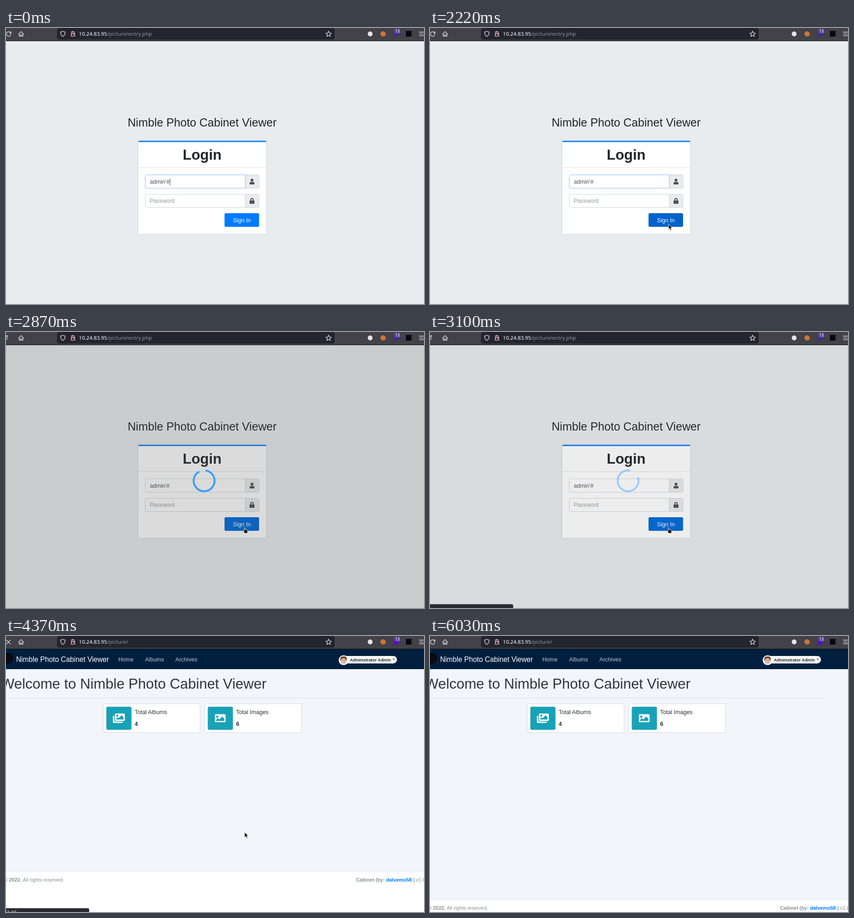
An HTML page for the animation above (6680 ms loop, 920 by 608 pixels).

```html
<!DOCTYPE html>
<html lang="en">
<head>
<meta charset="utf-8">
<title>Sign in</title>
<style>
  html, body { margin: 0; width: 100%; height: 100%; overflow: hidden; background: #e9ecef; }
  svg { display: block; width: 920px; height: 608px; }
  text { font-family: "Liberation Sans", Arial, sans-serif; font-size: 12.55px; white-space: pre; }
  .bar text { font-family: "Noto Sans", "Open Sans", sans-serif; font-size: 11.5px; }
  .line { fill: none; stroke: #f0f0f3; stroke-width: 1.2; stroke-linecap: round; stroke-linejoin: round; }
  .foot text { font-size: 10.95px; fill: #869099; }
  .b { font-weight: bold; }
  .card { fill: #fff; filter: drop-shadow(0 .8px 1px rgba(0,0,0,.27)); }
</style>
</head>
<body>
<svg viewBox="0 0 920 608">
  <defs>
    <clipPath id="face"><circle cx="743" cy="53.3" r="9.6"/></clipPath>
  </defs>

  <g id="login">
    <rect y="29" width="920" height="579" fill="#e9ecef"/>
    <text x="431.7" y="217" text-anchor="middle" fill="#212529" style="font-size:25.15px">Nimble Photo Cabinet Viewer</text>
    <rect class="card" x="291" y="248.5" width="282" height="205.5" rx="3"/>
    <path d="M291 251.2q0-2.7 2.7-2.7h276.6q2.7 0 2.7 2.7z" fill="#007bff"/>
    <path d="M291 307.5h282" stroke="#dfdfdf"/>
    <text class="b" x="431.7" y="290" text-anchor="middle" fill="#212529" style="font-size:31.35px">Login</text>

    <g stroke="#ced4da">
      <path d="M526.5 323.5h27.5q3 0 3 3v23.5q0 3-3 3h-27.5z" fill="#e9ecef"/>
      <path d="M526.5 366.5h27.5q3 0 3 3v23q0 3-3 3h-27.5z" fill="#e9ecef"/>
      <path id="field" d="M526.5 323.5h-217q-3 0-3 3v23.5q0 3 3 3h217z" fill="#fff"/>
      <path d="M526.5 366.5h-217q-3 0-3 3v23q0 3 3 3h217z" fill="#fff"/>
    </g>
    <text x="316.5" y="343" fill="#495057">admin'#</text>
    <path id="caret" d="M361 331.5v15" stroke="#333a40"/>
    <text x="316" y="385.3" fill="#939ba2">Password</text>
    <g fill="#495057">
      <path transform="translate(536 332) scale(.0245)" d="M224 256a128 128 0 1 0 0-256 128 128 0 0 0 0 256zm90 32h-17q-73 32-146 0h-17c-74 0-134 60-134 134v42q0 48 48 48h352q48 0 48-48v-42c0-74-60-134-134-134z"/>
      <path transform="translate(536 374.6) scale(.0245)" d="M400 224h-24v-72a152 152 0 0 0-304 0v72h-24q-48 0-48 48v192q0 48 48 48h352q48 0 48-48v-192q0-48-48-48zm-104 0h-144v-72a72 72 0 0 1 144 0z"/>
    </g>
    <rect id="button" x="481" y="408" width="76" height="30" rx="3"/>
    <text x="499.6" y="427.6" fill="#fff">Sign In</text>

    <g id="loader">
      <rect y="29" width="920" height="579" fill="#4b4b4b" opacity=".2"/>
      <path id="arc" fill="none" stroke="#369cff" stroke-width="4"/>
    </g>
  </g>

  <g id="home">
    <rect y="29" width="920" height="579" fill="#f2f5f9"/>
    <rect y="29" width="920" height="44" fill="#001f3f"/>
    <circle cx="4" cy="49" r="12" fill="#0b0b0d"/>
    <text x="22.2" y="56.5" fill="#fff" style="font-size:15.7px">Nimble Photo Cabinet Viewer</text>
    <g fill="#bfc7cf">
      <text x="247.2" y="55.6">Home</text>
      <text x="306" y="55.6">Albums</text>
      <text x="372.8" y="55.6">Archives</text>
    </g>
    <rect x="733" y="44" width="127.5" height="16.5" rx="8.2" fill="#f8f9fa"/>
    <circle cx="743" cy="53.3" r="10.8" fill="#f4f4f4"/>
    <g clip-path="url(#face)">
      <rect x="736" y="45.3" width="14" height="11" rx="5" fill="#4b3328"/>
      <rect x="737.3" y="48.6" width="11.4" height="12.2" rx="5" fill="#e5b394"/>
      <path d="M734 65q1-5 9-5t9 5z" fill="#d9dde0"/>
      <path d="M739.5 52.5h2M744.5 52.5h2" stroke="#4b3328"/>
    </g>
    <text class="b" x="757" y="55.6" fill="#212529" style="font-size:9.4px">Adminstrator Admin</text>
    <path d="M851 50.3h4.8l-2.4 2.5z" fill="#212529"/>

    <text x="-11.1" y="116" fill="#30363c" style="font-size:31.45px">Welcome to Nimble Photo Cabinet Viewer</text>
    <path d="M0 136.5h873" stroke="#dcdee1"/>

    <g fill="#2a3036">
      <rect class="card" x="214.5" y="150" width="212" height="62.3" rx="3"/>
      <rect class="card" x="438" y="150" width="212" height="62.3" rx="3"/>
      <g fill="#17a2b8" style="filter:drop-shadow(0 .8px 1px rgba(0,0,0,.25))">
        <rect x="221" y="156" width="55" height="50.5" rx="3"/>
        <rect x="444.3" y="156" width="55" height="50.5" rx="3"/>
      </g>
      <g fill="#fff">
        <path transform="translate(235.2 169.4) scale(.0459)" d="M480 416v16q0 48-48 48h-384q-48 0-48-48v-256q0-48 48-48h16v208q0 80 80 80zM576 336v-256q0-48-48-48h-384q-48 0-48 48v256q0 48 48 48h384q48 0 48-48zM256 128a48 48 0 1 1-96 0 48 48 0 0 1 96 0zM160 272l56-56q8-7 16 0l40 40 136-136q8-7 16 0l88 88v112h-352z" fill-rule="evenodd"/>
        <path transform="translate(459.8 169.4) scale(.0459)" d="M464 448h-416q-48 0-48-48v-288q0-48 48-48h416q48 0 48 48v288q0 48-48 48zM112 120a56 56 0 1 0 0 112 56 56 0 0 0 0-112zM64 384h384v-112l-88-88q-8-7-16 0l-136 136-56-56q-8-7-16 0l-72 72z" fill-rule="evenodd"/>
      </g>
      <text x="283.3" y="172.4">Total Albums</text>
      <text class="b" x="283.3" y="198.3">4</text>
      <text x="506.6" y="172.4">Total Images</text>
      <text class="b" x="506.6" y="198.3">6</text>
    </g>

    <g id="footer" class="foot">
      <rect width="920" height="100" fill="#fff"/>
      <path d="M0 .5h920" stroke="#dee2e6"/>
      <text class="b" x="-4.6" y="22.8">© 2022.</text>
      <text x="37" y="22.8">All rights reserved.</text>
      <text class="b" x="833.4" y="22.8" text-anchor="end">Cabinet (by:</text>
      <text class="b" x="836.6" y="22.8" style="fill:#007bff">dalvemo58</text>
      <text class="b" x="896" y="22.8">)</text>
      <text x="902.6" y="22.8">v1.0</text>
    </g>
  </g>

  <g id="status" class="bar">
    <path d="M0 599.7h180q3 0 3 3v6h-183z" fill="#2b2a33"/>
    <path d="M0 599.9h180q2.8 0 2.8 3v6" fill="none" stroke="#54535c" stroke-width=".6"/>
    <text id="host" x="-5" y="612.5" fill="#e4e4e8">83.95</text>
  </g>

  <g class="bar">
    <rect width="920" height="29" fill="#424248"/>
    <rect y="28" width="920" height="1" fill="#121216"/>
    <rect x="113" y=".5" width="609.5" height="24.5" rx="3" fill="#25252f" stroke="#1a1a20"/>
    <path id="reload" class="line" d="M10 10.2a5 5 0 1 0 .8 4.2M11 8v3.3h-3.6"/>
    <path id="morph" class="line" d="M0 8.6l4.2-.6M3.8 8.4q-3.6 3.6-1.6 8.6"/>
    <path id="stop" class="line" d="M1 9l8.6 8.6M9.6 9l-8.6 8.6"/>
    <path class="line" d="M28 13l5.2-5.2 5.2 5.2M29.2 12.4v6h2.6v-3.6h2.8v3.6h2.6v-6"/>
    <path class="line" d="M125.2 7.3l5 1.8q.2 7-5 9.5-5.2-2.5-5-9.5z"/>
    <path class="line" d="M143.6 12.2h7.6v5.8h-7.6zM145 12v-2a2.4 2.4 0 0 1 4.8 0v2"/>
    <path d="M142.4 7.6l10 11" stroke="#e2605f" stroke-width="1.3"/>
    <text x="160.6" y="17.2" fill="#fbfbfe">10.24.83.95<tspan id="page" fill="#94949b"></tspan></text>
    <path class="line" d="M710 7l1.8 4 4.3.4-3.3 2.9 1 4.3-3.8-2.3-3.8 2.3 1-4.3-3.3-2.9 4.3-.4z"/>
    <circle cx="801.5" cy="13" r="5.4" fill="#e4e4e8"/>
    <circle cx="830" cy="13" r="5.8" fill="#cf7438"/>
    <rect id="addon" x="853" y="8" width="11" height="11"/>
    <rect x="855.5" y="1.5" width="12.5" height="10.5" rx="1.5" fill="#5a45a0"/>
    <text x="861.7" y="9.8" text-anchor="middle" fill="#fff" style="font-size:8px">13</text>
    <rect x="880" y="6.5" width="12.5" height="12.5" fill="#08090f"/>
    <path class="line" d="M910 9.2h9M910 13h9M910 16.8h9"/>
  </g>

  <g id="pointer" stroke="#fff" stroke-linejoin="round" fill="#16161a">
    <path id="arrow" stroke-width=".9" d="M0 0v12l2.8-2.5 2 4.4 2-.9-2-4.3h3.7z"/>
    <path id="hand" stroke-width=".8" d="M-.4-.6q1.5-.8 1.9.8v3l4.3.9q1.3.3 1.2 1.7l-.6 5.4h-6.2l-3-4.3q-.4-1.3 1.3-.9l1 .6v-5.9z"/>
  </g>
</svg>
<script>
const LOOP = 6680, STEP = 67;
const el = {};
document.querySelectorAll("[id]").forEach(n => el[n.id] = n);

const show = (node, on) => node.setAttribute("display", on ? "inline" : "none");
const clamp = v => Math.max(0, Math.min(1, v));
const within = (t, a, b) => t >= a && t < b;
const swing = u => .5 - Math.cos(u * Math.PI) / 2;

function route(start, end, d, ease) {
  const path = document.createElementNS("http://www.w3.org/2000/svg", "path");
  path.setAttribute("d", d);
  const length = path.getTotalLength();
  return { start, at(t) {
    const held = Math.floor((t - start + 1) / STEP) * STEP;
    return path.getPointAtLength(length * ease(clamp(held / (end - start - 9))));
  } };
}

const routes = [
  route(170, 370, "M832 576Q780 440 693 419", u => u * (2 - u)),
  route(960, 1570, "M693 419Q605 360 525 432", swing),
  route(5230, 5830, "M525 432C570 418 640 395 690 402C760 415 830 500 860 600", u => u)
];

// Ring with a gap that turns and widens around the fullest moment
function ring(t) {
  const s = t - 2870;
  const mid = -100 + s * 51 / 230, half = 18 + Math.abs(s) * 11 / 230;
  const point = deg => {
    const a = deg * Math.PI / 180;
    return `${436 + 23 * Math.cos(a)} ${327.7 + 23 * Math.sin(a)}`;
  };
  return `M${point(mid + half)}A23 23 0 1 1 ${point(mid - half)}`;
}

function buttonColor(t, p) {
  if (within(t, 1640, 2280)) return "#0062cc";
  const over = t >= 960 && p.x < 557 && p.y > 408;
  return over ? "#0069d9" : "#007bff";
}

function loaderOpacity(t) {
  if (t < 2280 || t >= 3300) return 0;
  if (t >= 3100) return .5;
  return swing(clamp((t - 2280 + STEP) / 460));
}

function draw(t) {
  const home = t >= 4370, loaded = t >= 4900;
  show(el.login, !home);
  show(el.home, home);

  const active = routes.filter(r => t >= r.start).pop() || routes[0];
  const p = active.at(t);
  const hand = within(t, 1500, 1960) || within(t, 2280, 3970);
  show(el.pointer, within(t, 170, 5830));
  show(el.hand, hand);
  show(el.arrow, !hand);
  el.pointer.setAttribute("transform", `translate(${p.x} ${p.y})`);

  show(el.caret, t < 170 || within(t, 1640, 1760));
  el.field.setAttribute("stroke", t < 2350 ? "#80bdff" : "#ced4da");
  el.button.setAttribute("fill", buttonColor(t, p));
  el.loader.setAttribute("opacity", loaderOpacity(t));
  const held = t >= 3100 ? 3100 : t >= 2870 ? 2870 : Math.floor(t / STEP) * STEP;
  el.arc.setAttribute("d", ring(Math.max(2280, held)));

  el.footer.setAttribute("transform", `translate(0 ${loaded ? 580.5 : 518.5})`);
  show(el.status, within(t, 3100, 4900));
  show(el.host, t >= 3970);

  const morph = within(t, 2870, 3300) || within(t, 4900, 5230);
  const stop = within(t, 3300, 4900);
  show(el.morph, morph);
  show(el.stop, stop);
  show(el.reload, !morph && !stop);
  el.page.textContent = t < 3370 ? "/picture/entry.php" : "/picture/";
  el.addon.setAttribute("fill", t < 3370 ? "#40318a" : "#5a0fc0");
}

const begin = performance.now();
function tick() {
  draw((performance.now() - begin) % LOOP);
  requestAnimationFrame(tick);
}
tick();
</script>
</body>
</html>
```
